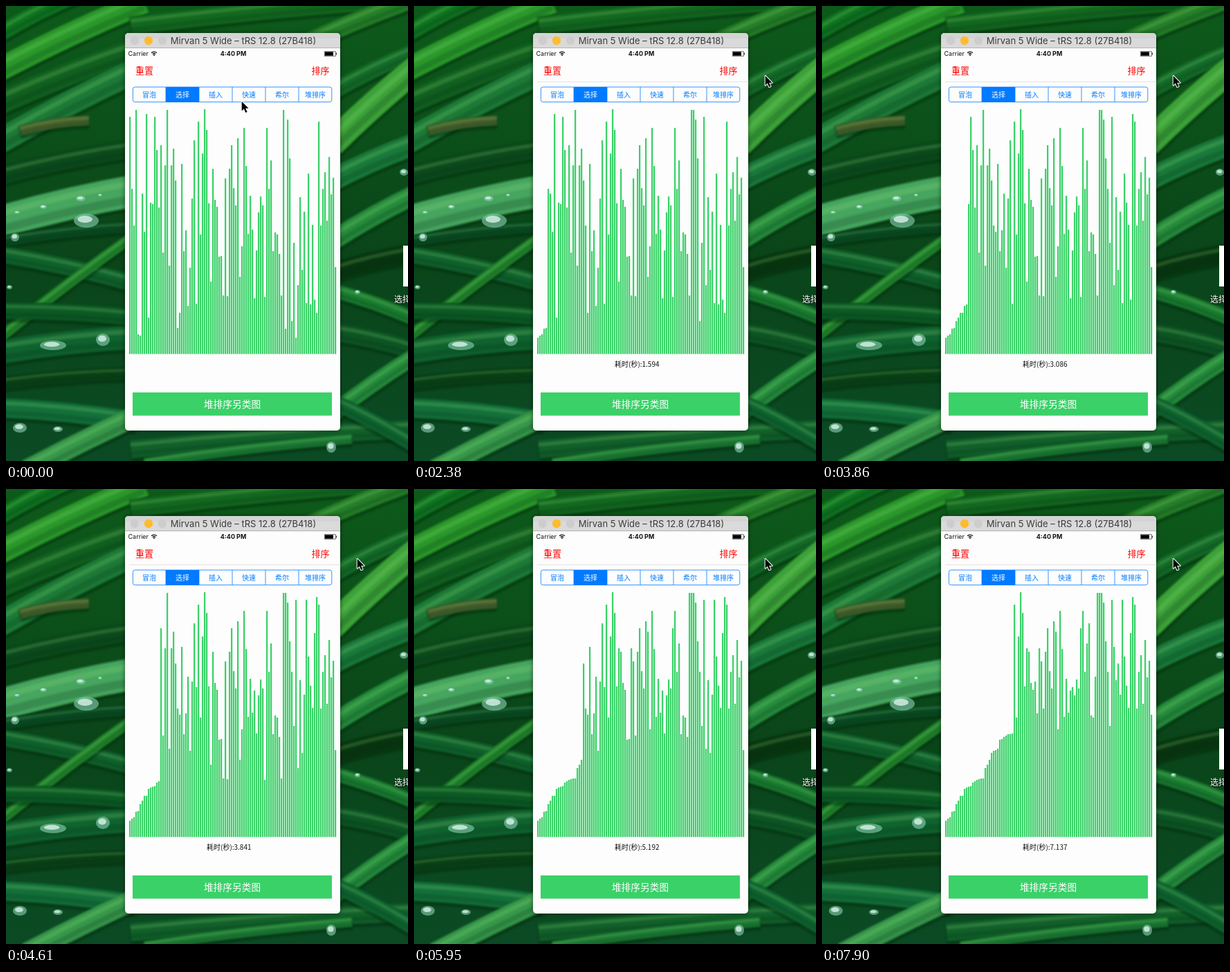
Animation of 581x657 px, one loop 8000 ms. Source, as an HTML page with a canvas:

```html
<!DOCTYPE html>
<html lang="zh">
<head>
<meta charset="utf-8">
<title>选择排序</title>
<style>
  html, body { margin: 0; width: 100%; height: 100%; overflow: hidden; background: #0a4a1c; }
  canvas { display: block; }
</style>
</head>
<body>
<canvas id="stage" width="581" height="657"></canvas>
<script>
const W = 581, H = 657, LOOP = 8000;
const stage = document.getElementById('stage').getContext('2d');
const LATIN = 'Inter, "Noto Sans", sans-serif';
const CJK = '"Noto Sans CJK SC", "Noto Sans CJK", "Noto Sans", sans-serif';
const BLUE = '#007aff', GREEN = '#3ad168', PAPER = '#fdfdfd';

// Top edge of each bar before sorting
const TOPS = [
  160, 264, 317, 150, 474, 476, 271, 326, 156, 450, 284, 286, 160, 208, 291, 201, 356, 230, 150, 375,
  230, 206, 252, 465, 443, 228, 354, 324, 433, 378, 278, 194, 430, 167, 330, 213, 149, 179, 285, 398,
  235, 280, 290, 362, 361, 418, 249, 419, 235, 201, 263, 288, 191, 391, 347, 176, 231, 329, 274, 323,
  422, 353, 298, 275, 288, 420, 176, 264, 223, 354, 327, 330, 358, 418, 150, 466, 164, 220, 455, 342,
  479, 403, 276, 381, 297, 429, 242, 431, 316, 424, 443, 167, 317, 264, 240, 310, 218, 272, 248, 377];

// x1, y1, x2, y2, width, colour
const BLADES = [
  [-10, 40, 110, -20, 24, '#0f7420'],
  [-10, 92, 200, -6, 34, '#2a982a'],
  [-10, 140, 190, 62, 34, '#11601f'],
  [-10, 196, 190, 92, 36, '#1c7a36'],
  [20, 180, 120, 165, 14, '#47602c'],
  [-10, 245, 190, 205, 26, '#0c4a1c'],
  [-10, 312, 190, 266, 46, '#46a55e'],
  [-10, 340, 190, 318, 16, '#0a4a22'],
  [-10, 358, 190, 402, 24, '#10622c'],
  [-10, 480, 190, 328, 15, '#22852c'],
  [-10, 440, 190, 450, 24, '#0c5a24'],
  [-10, 500, 190, 478, 34, '#0f632e'],
  [-10, 545, 190, 530, 18, '#0a4016'],
  [-10, 580, 190, 600, 28, '#13703a'],
  [30, 670, 260, 560, 30, '#37984a'],
  [180, 640, 600, 610, 26, '#12602a'],
  [200, 660, 500, 625, 14, '#1d7b34'],
  [180, 28, 600, -12, 26, '#13691f'],
  [420, 60, 600, -14, 26, '#257f28'],
  [470, 124, 600, 62, 24, '#146b28'],
  [470, 200, 600, 84, 38, '#3ca238'],
  [470, 252, 600, 196, 32, '#19793a'],
  [470, 340, 600, 268, 28, '#268c3c'],
  [470, 385, 600, 355, 26, '#08350f'],
  [470, 410, 600, 456, 20, '#1a7c30'],
  [470, 470, 600, 500, 26, '#0d5524'],
  [470, 590, 600, 500, 24, '#258c3c'],
  [470, 570, 600, 640, 22, '#0f6430']];

// x, y, horizontal radius, vertical radius
const DROPS = [
  [16, 298, 4, 2], [54, 290, 5, 3], [108, 278, 7, 4], [116, 310, 18, 10], [136, 273, 3, 2],
  [13, 334, 6, 6], [68, 490, 19, 7], [140, 482, 10, 9], [20, 609, 10, 7], [75, 611, 7, 4],
  [5, 406, 4, 3], [575, 240, 6, 5], [470, 637, 7, 8], [508, 413, 4, 3]];

// time, x, y of the pointer tip
const POINTER = [
  [0, 340, 137], [150, 350, 131], [300, 395, 110], [440, 432, 97], [590, 441, 93.5], [890, 441, 93.5],
  [1040, 446, 94], [1190, 463, 95], [1330, 484, 97], [1480, 499, 99], [1630, 507, 100]];

// time, seconds on the stopwatch
const WATCH = [
  [890, .107], [1330, .548], [2380, 1.594], [3120, 2.341], [4610, 3.841], [5950, 5.192], [7900, 7.137]];

function track(keys, t, column = 1) {
  const next = keys.findIndex(key => key[0] > t);
  if (next === 0) return keys[0][column];
  if (next < 0) return keys[keys.length - 1][column];
  const a = keys[next - 1], b = keys[next];
  return a[column] + (b[column] - a[column]) * (t - a[0]) / (b[0] - a[0]);
}

function text(g, string, x, y, font, color, align = 'left') {
  g.font = font;
  g.fillStyle = color;
  g.textAlign = align;
  g.fillText(string, x, y);
}

function rect(g, x, y, w, h, color) {
  g.fillStyle = color;
  g.fillRect(x, y, w, h);
}

function disc(g, x, y, rx, ry, color) {
  g.fillStyle = color;
  g.beginPath();
  g.ellipse(x, y, rx, ry, 0, 0, Math.PI * 2);
  g.fill();
}

function line(g, x1, y1, x2, y2, width, color) {
  g.strokeStyle = color;
  g.lineWidth = width;
  g.beginPath();
  g.moveTo(x1, y1);
  g.quadraticCurveTo((x1 + x2) / 2, (y1 + y2) / 2 - 6, x2, y2);
  g.stroke();
}

function drawMeadow(g) {
  const base = g.createLinearGradient(0, 0, 0, H);
  base.addColorStop(0, '#0d5a1a');
  base.addColorStop(.55, '#0a4519');
  base.addColorStop(1, '#0b4a24');
  rect(g, 0, 0, W, H, base);
  g.filter = 'blur(1.5px)';
  for (const [x1, y1, x2, y2, width, color] of BLADES) {
    line(g, x1, y1 + 3, x2, y2 + 3, width + 4, 'rgba(3,40,12,.45)');
    line(g, x1, y1, x2, y2, width, color);
    line(g, x1, y1 - width / 4, x2, y2 - width / 4, width / 5, 'rgba(150,230,130,.2)');
    line(g, x1, y1 + width / 4, x2, y2 + width / 4, width / 4, 'rgba(0,40,20,.2)');
  }
  g.filter = 'blur(.7px)';
  for (const [x, y, rx, ry] of DROPS) {
    disc(g, x, y, rx, ry, 'rgba(130,200,170,.65)');
    disc(g, x - rx * .1, y - ry * .2, rx * .6, ry * .5, 'rgba(225,248,240,.75)');
  }
  g.filter = 'none';
}

function drawDesktopIcon(g) {
  rect(g, 574, 346, 7, 59, '#fff');
  g.shadowColor = '#000';
  g.shadowBlur = 2;
  g.shadowOffsetY = 1;
  text(g, '选择排序', 561, 428, '500 12px ' + CJK, '#fff');
  g.shadowColor = 'transparent';
  g.shadowOffsetY = 0;
}

function drawWindow(g) {
  g.shadowColor = 'rgba(0,0,0,.5)';
  g.shadowBlur = 6;
  g.fillStyle = PAPER;
  g.beginPath();
  g.roundRect(172, 39, 311, 574, 5);
  g.fill();
  g.shadowColor = 'transparent';

  g.save();
  g.clip();
  rect(g, 172, 39, 311, 22, '#d4d4d4');
  rect(g, 172, 47, 311, 13, '#dadada');
  rect(g, 172, 60, 311, 1, '#b4b4b4');
  g.restore();
  [[186, '#cdcdcd'], [206, '#fdbc30'], [226, '#cdcdcd']].forEach(([x, color]) => disc(g, x, 50, 6.2, 6.2, color));
  text(g, 'Mirvan 5 Wide – tRS 12.8 (27B418)', 343, 55, '13px ' + LATIN, '#3a3a3a', 'center');
}

function drawStatusBar(g) {
  text(g, 'Carrier', 176.5, 72, '9px ' + LATIN, '#111');
  text(g, '4:40 PM', 328.5, 72, 'bold 9px ' + LATIN, '#111', 'center');
  g.strokeStyle = '#111';
  g.lineWidth = 1.3;
  for (const r of [2.8, 5.4]) {
    g.beginPath();
    g.arc(214, 71.5, r, -Math.PI * .76, -Math.PI * .24);
    g.stroke();
  }
  disc(g, 214, 71, 1, 1, '#111');
  g.lineWidth = .6;
  g.strokeRect(460.3, 65.8, 16, 6.4);
  rect(g, 461, 66.3, 12, 5.4, '#000');
  rect(g, 477, 67.6, 1, 2.8, '#333');
}

function drawSegments(g) {
  rect(g, 231, 117, 48, 22, BLUE);
  g.strokeStyle = BLUE;
  g.lineWidth = .8;
  g.beginPath();
  g.roundRect(183.4, 117, 287.4, 21.6, 3);
  for (let i = 1; i < 6; i++) {
    g.moveTo(183 + i * 48, 117);
    g.lineTo(183 + i * 48, 138.5);
  }
  g.stroke();
  ['冒泡', '选择', '插入', '快速', '希尔', '堆排序'].forEach((label, i) =>
    text(g, label, 207 + i * 48, 131.5, '10px ' + CJK, i === 1 ? '#fff' : BLUE, 'center'));
}

const backdrop = document.createElement('canvas');
backdrop.width = W;
backdrop.height = H;
const back = backdrop.getContext('2d');
drawMeadow(back);
drawDesktopIcon(back);
drawWindow(back);
drawStatusBar(back);
drawSegments(back);
text(back, '重置', 187, 97.5, '13px ' + CJK, '#f00');
text(back, '排序', 441.5, 97.5, '13px ' + CJK, '#f00');
rect(back, 183, 558, 288, 33.5, GREEN);
text(back, '堆排序另类图', 327, 580, '13.7px ' + CJK, '#fff', 'center');

function selectionSort(passes) {
  const tops = TOPS.slice();
  for (let i = 0; i < passes; i++) {
    let lowest = i;
    for (let j = i + 1; j < tops.length; j++) if (tops[j] > tops[lowest]) lowest = j;
    [tops[i], tops[lowest]] = [tops[lowest], tops[i]];
  }
  return tops;
}

// Every comparison takes the same time, so later passes are shorter.
function passesAt(t) {
  const compared = Math.max(0, t - 1120) / 2.44;
  return Math.floor(100 - Math.sqrt(10000 - 2 * compared));
}

// The picture refreshes about every 149 ms.
function refreshTime(t) {
  if (t >= 5950) return 5950 + Math.floor((t - 5950) / 150) * 150;
  let k = Math.floor(t / 148.75) + 1;
  const start = n => Math.floor(n * 14.875) * 10;
  while (start(k) > t) k--;
  return start(k);
}

function drawPointer(g, x, y) {
  g.save();
  g.translate(x, y);
  g.beginPath();
  [[.7, .8], [.7, 14.5], [3.8, 11.6], [6.3, 17], [8.6, 16], [6.2, 10.8], [10.6, 10.8]]
    .forEach(([px, py]) => g.lineTo(px, py));
  g.closePath();
  g.lineJoin = 'round';
  g.strokeStyle = '#fff';
  g.lineWidth = 2;
  g.stroke();
  g.fillStyle = '#000';
  g.fill();
  g.restore();
}

function draw(now) {
  const t = refreshTime(now % LOOP);
  stage.drawImage(backdrop, 0, 0);
  selectionSort(passesAt(t)).forEach((top, i) => rect(stage, 178 + i * 3, top, 2.25, 502.5 - top, GREEN));
  if (t >= 890) {
    const left = t < 1480 ? 291 : 178;
    rect(stage, left, 109, 482 - left, 1, '#e2e2e2');
    text(stage, '耗时(秒):' + track(WATCH, t).toFixed(3), 290, 521.3, '10px ' + CJK, '#111');
  }
  drawPointer(stage, track(POINTER, t), track(POINTER, t, 2));
  requestAnimationFrame(() => draw(performance.now() - startedAt));
}

const startedAt = performance.now();
draw(0);
</script>
</body>
</html>
```
